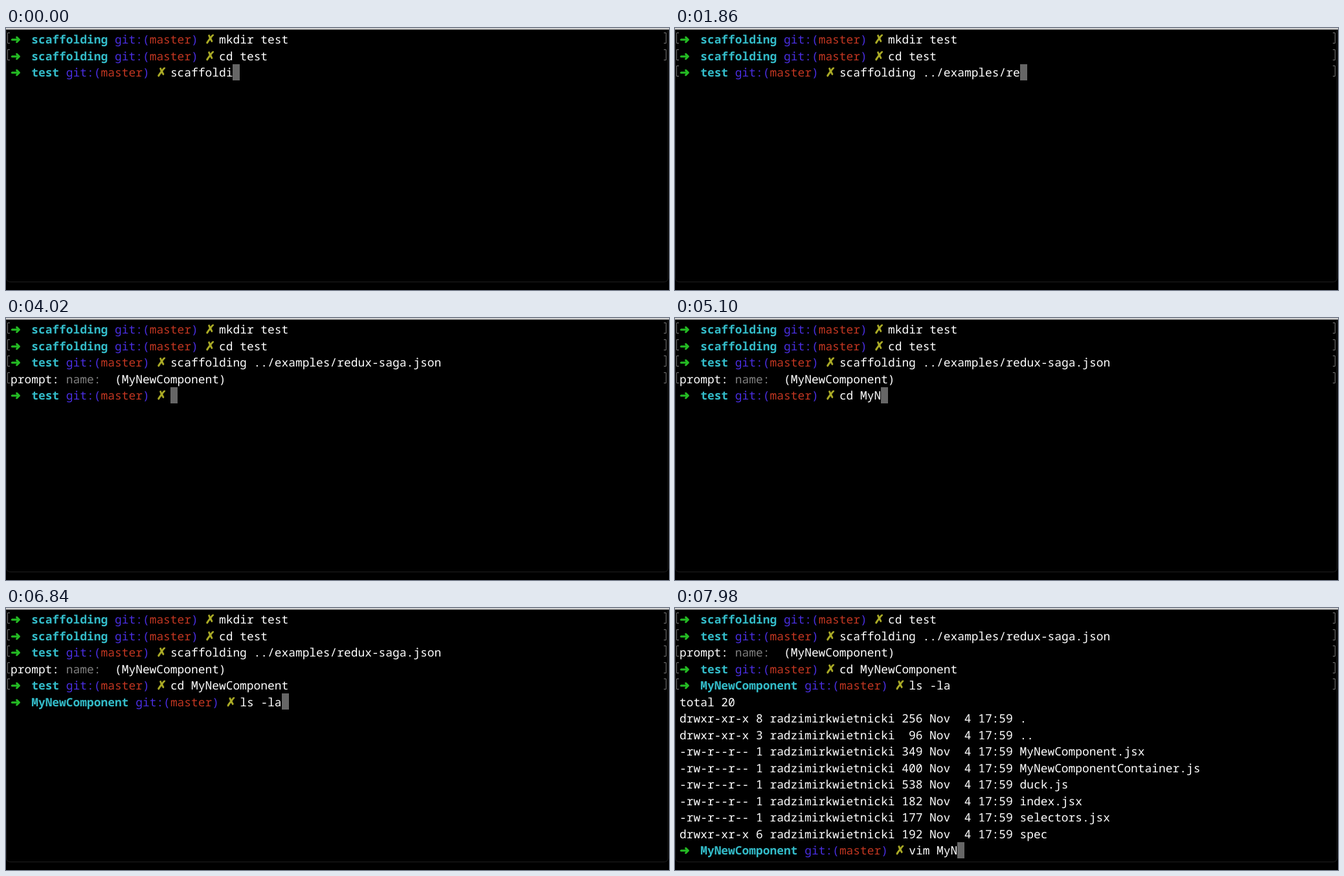
Animation, 1024 px wide and 405 px high, one loop 8000 ms. Source, as an HTML page:

```html
<!DOCTYPE html>
<html lang="en">
<head>
<meta charset="utf-8">
<title>Terminal session</title>
<style>
  html, body { margin: 0; width: 100%; height: 100%; overflow: hidden; background: #000; }
  svg { display: block; }
  text {
    font: 500 17.89px "Noto Sans Mono", "DejaVu Sans Mono", monospace;
    white-space: pre;
    text-rendering: geometricPrecision;
    fill: #fff;
  }
  .dir { font-weight: 600; fill: #33bbc8; }
  .git { fill: #492ee1; }
  .branch { fill: #c23621; }
  .arrow, .cross { font: bold 19px "DejaVu Sans", sans-serif; stroke-width: .7; }
  .arrow { fill: #25bc24; stroke: #25bc24; }
  .cross { fill: #adad27; stroke: #adad27; }
  .dim { fill: #808080; }
  .mark { fill: none; stroke: #777; }
  .cursor { fill: #666; }
  .frame { fill: none; stroke: #1e1e1e; }
  .bar { fill: #d0d0d0; }
</style>
</head>
<body>
<svg width="1024" height="405" viewBox="0 0 1024 405">
  <path class="frame" d="M.5 3V386Q.5 392.5 7 392.5H1016Q1022.5 392.5 1022.5 386V3"/>
  <rect class="bar" width="1024" height="2.5"/>
  <g id="screen"></g>
</svg>
<script>
const LOOP = 8000, CELL = 10.734, ROW = 25.5, LEFT = 7, BASELINE = 24, VISIBLE_ROWS = 15;
const screen = document.getElementById('screen');

// Each key is [time, characters added to the command line].
const typing = (start, keys) => {
  let text = start;
  return keys.map(([time, added]) => [time, text += added]);
};
const scaffoldKeys = typing('scaffoldi', [
  [0, ''], [120, 'n'], [240, 'g'], [420, ' '], [600, '.'], [720, '.'], [900, '/'],
  [960, 'e'], [1020, 'x'], [1260, 'amples/'], [1620, 'r'], [1740, 'e'], [2040, 'dux-saga.json ']
]);
const cdKeys = [
  ...typing('', [
    [4260, 'c'], [4380, 'd'], [4500, ' '], [4740, 'M'], [4920, 'y'], [5040, 'N'],
    [5280, 'ewComponent/']
  ]),
  [5940, 'cd MyNewComponent']
];
const lsKeys = typing('', [
  [6180, 'l'], [6300, 's'], [6420, ' '], [6600, '-'], [6720, 'l'], [6780, 'a']
]);
const vimKeys = typing('', [
  [7380, 'v'], [7440, 'i'], [7560, 'm'], [7680, ' '], [7800, 'M'], [7860, 'y'], [7980, 'N']
]);
const typedAt = (keys, t) => keys.findLast(([time]) => time <= t)?.[1] ?? '';

const line = (runs, marked = false) => ({ runs, marked });
const prompt = (dir, command, marked) => {
  const git = 4 + dir.length;
  return line([
    [0, 'arrow', '➜'], [3, 'dir', dir], [git, 'git', 'git:('], [git + 5, 'branch', 'master'],
    [git + 11, 'git', ')'], [git + 13, 'cross', '✗'], [git + 15, 'out', command]
  ], marked);
};

const listing = [
  [8, 256, '.'], [3, 96, '..'], [1, 349, 'MyNewComponent.jsx'],
  [1, 400, 'MyNewComponentContainer.js'], [1, 538, 'duck.js'], [1, 182, 'index.jsx'],
  [1, 177, 'selectors.jsx'], [6, 192, 'spec']
].map(([links, size, name]) => {
  const mode = links > 1 ? 'drwxr-xr-x' : '-rw-r--r--';
  return `${mode} ${links} radzimirkwietnicki ${String(size).padStart(3)} Nov  4 17:59 ${name}`;
});

function linesAt(t) {
  const component = 'MyNewComponent';
  const lines = [
    prompt('scaffolding', 'mkdir test', true),
    prompt('scaffolding', 'cd test', true),
    prompt('test', typedAt(scaffoldKeys, t), t >= 900)
  ];
  if (t >= 2820) lines.push(line([
    [0, 'out', 'prompt:'], [8, 'dim', 'name:'], [15, 'out', `(${component}) `]
  ], t >= 3180));
  if (t >= 3300) lines.push(prompt('test', typedAt(cdKeys, t), t >= 5280));
  if (t >= 5940) lines.push(prompt(component, typedAt(lsKeys, t), t >= 7020));
  if (t >= 7080) lines.push(
    ...['total 20', ...listing].map(text => line([[0, 'out', text]])),
    prompt(component, typedAt(vimKeys, t), false)
  );
  return lines.slice(-VISIBLE_ROWS);
}

function drawLine({ runs, marked }, row) {
  const y = row * ROW;
  const texts = runs.map(([col, kind, text]) =>
    `<text class="${kind}" x="${LEFT + col * CELL}" y="${BASELINE + y}">${text}</text>`).join('');
  const top = Math.round(y + 7) + .5;
  const marks = `<path class="mark" d="M6 ${top}H2.5v16H6M1016 ${top}h3.5v16h-3.5"/>`;
  return texts + (marked ? marks : '');
}

function drawCursor(lines) {
  const [col, , text] = lines.at(-1).runs.at(-1);
  const x = Math.round(LEFT + (col + text.length) * CELL);
  const y = Math.round(4.5 + (lines.length - 1) * ROW);
  return `<rect class="cursor" x="${x}" y="${y}" width="11" height="25"/>`;
}

let shown = '';
const start = performance.now();
function render(now) {
  const lines = linesAt(Math.max(0, now - start) % LOOP);
  const markup = drawCursor(lines) + lines.map(drawLine).join('');
  if (markup !== shown) screen.innerHTML = shown = markup;
  requestAnimationFrame(render);
}
render(start);
</script>
</body>
</html>
```
